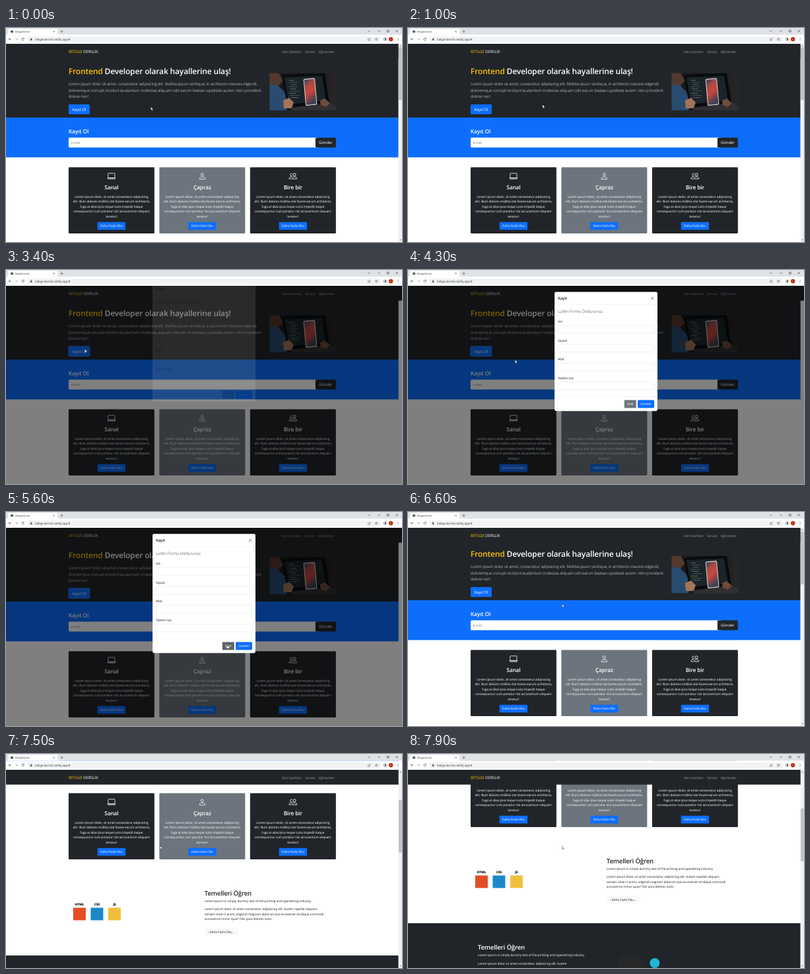
An HTML page for the animation above (8 s loop, 600x325 px).

```html
<!DOCTYPE html>
<html lang="tr">
<head>
<meta charset="utf-8">
<title>BitilgeDerslik</title>
<style>
html, body { margin: 0; width: 100%; height: 100%; overflow: hidden; background: #fff; }
svg { display: block; width: 600px; height: 325px; }
text {
  font-family: "Open Sans", "Noto Sans", sans-serif;
  letter-spacing: -.017em;
  text-rendering: geometricPrecision;
  white-space: pre;
}
</style>
</head>
<body>
<svg id="stage" viewBox="0 0 600 325" xmlns="http://www.w3.org/2000/svg"></svg>
<script>
const DARK = '#212529', BLUE = '#0d6efd', GREY = '#6c757d', AMBER = '#ffc107', INK = '#46494d';
const LOOP = 8000, STEP = 100;

// ---------- drawing helpers ----------
const rect = (x, y, w, h, fill, r = 0, more = '') =>
  `<rect x="${x}" y="${y}" width="${w}" height="${h}" fill="${fill}" rx="${r}" ${more}/>`;
const text = (x, y, str, size = 5, fill = '#fff', weight = 400, anchor = 'start') =>
  `<text x="${x}" y="${y}" font-size="${(size * .96).toFixed(2)}" fill="${fill}" font-weight="${weight}" text-anchor="${anchor}">${str}</text>`;
const lines = (x, y, step, rows, ...style) =>
  rows.map((row, i) => text(x, y + i * step, row, ...style)).join('');
const line = (d, stroke, width = .4, fill = 'none') =>
  `<path d="${d}" stroke="${stroke}" stroke-width="${width}" fill="${fill}" stroke-linejoin="round"/>`;
const group = (id, body) => `<g id="${id}">${body}</g>`;
const dot = (x, y, r, fill) => `<circle cx="${x}" cy="${y}" r="${r}" fill="${fill}"/>`;
const poly = (points, fill) => `<polygon points="${points}" fill="${fill}"/>`;

// ---------- page ----------
function photo() {
  let code = '';
  for (let i = 0; i < 9; i++) {
    code += rect(429 + i % 3 * 1.5, 79 + i * 3.3, 7 + i * 5 % 9, .7, i % 2 ? '#4d6a68' : '#77807c');
  }
  return `<g clip-path="url(#photoBox)">
    ${rect(399.5, 68.5, 100.5, 56.5, 'url(#room)')}
    ${poly('399,68 413,68 420,80 411,90 399,86', '#53392d')}
    ${poly('399,86 411,86 422,97 428,112 425,126 399,126', '#294b70')}
    ${poly('418,72 483,68.5 490,113 427,120', '#080b0e')}
    ${poly('422,75 479,72.5 485,110 429,116', '#1b2429')}
    ${code}
    ${poly('420,110 429,106 436,113 433,122 421,122', '#a27458')}
    <g transform="rotate(-5 461 98)">
      ${rect(452.5, 76.5, 17.5, 41, '#d9d5d6', 2)}
      ${rect(453.5, 77.8, 15.5, 38.4, 'url(#screen)', 1.4)}
    </g>
    ${poly('432,121 492,114 500,118 500,126 432,126', '#302f31')}
    ${poly('476,110 483,107 491,114 485,120 477,117', '#6f4b3a')}
  </g>`;
}

const icons = [
  line('M2.5 2.5h11a1 1 0 0 1 1 1v8h-13v-8a1 1 0 0 1 1-1zM.5 11.5h15v.5a1.5 1.5 0 0 1-1.5 1.5H2A1.5 1.5 0 0 1 .5 12z', '#fff', 1),
  line('M10.5 5a2.5 2.5 0 1 1-5 0 2.5 2.5 0 0 1 5 0zM2.5 13.3c0-2.6 2.5-3.8 5.5-3.8s5.5 1.2 5.5 3.8q0 .7-.7.7H3.2q-.7 0-.7-.7z', '#fff', 1),
  line('M13.5 5a2.5 2.5 0 1 1-5 0 2.5 2.5 0 0 1 5 0zM6.5 12.8c0-2.2 1.7-3.6 4.5-3.6s4.5 1.400 4.500 3.600q0 .6-.6.6H7.100q-.6 0-.6-.6zM6.800 7A2.400 2.400 0 1 1 6.800 3.600M5 13.400H1.100q-.6 0-.6-.6C.5 10.600 2.200 9.200 5.800 9.200', '#fff', 1.1)
];

const cardText = [
  'Lorem ipsum dolor, sit amet consectetur adipisicing',
  'elit. Illum dolores mollitia iste facere earum architecto,',
  'fuga at alias ipsa neque iusto impedit itaque',
  'consequuntur cum pariatur nisi accusantium aliquam',
  'tenetur!'
];

function card(i, title) {
  const x = 95 + i * 137.5, mid = x + 65;
  return rect(x, 211.5, 130, 100.5, i === 1 ? GREY : DARK, 1.25) +
    `<g transform="translate(${mid - 6.25} 218.7) scale(.78)">${icons[i]}</g>` +
    text(mid, 245.4, title, 8.75, '#fff', 600, 'middle') +
    lines(mid, 257.8, 7.5, cardText, 5, '#fff', 400, 'middle') +
    rect(mid - 21.2, 294.7, 42.4, 11.9, BLUE, 1.2) +
    text(mid, 302.3, 'Daha Fazla Oku', 5, '#fff', 400, 'middle');
}

const badge = (x, label, fill) =>
  text(x + 9.5, 382.4, label, 5, '#111', 800, 'middle') + rect(x, 385.5, 19, 19, fill);

const intro = 'Lorem Ipsum is simply dummy text of the printing and typesetting industry.';

const page =
  rect(0, 24, 594.85, 112.5, DARK) +
  `<text x="95" y="70.2" font-size="12" font-weight="600" fill="#fff" style="letter-spacing:-.013em"><tspan fill="${AMBER}">Frontend</tspan> Developer olarak hayallerine ulaş!</text>` +
  lines(95, 87.4, 9.375, [
    'Lorem ipsum dolor sit amet, consectetur adipisicing elit. Mollitia ipsum similique, in architecto maiores eligendi,',
    'doloremque corrupti incidunt laudantium molestias aliquam odit earum beatae cupiditate autem. Vero provident',
    'dolore non!'
  ], 6.25, '#fff', 300) +
  rect(95, 116, 32, 15, BLUE, 1.5, 'id="join"') +
  text(111, 125.8, 'Kayıt Ol', 6.25, '#fff', 400, 'middle') +
  photo() +
  rect(0, 136, 594.85, 60.5, BLUE) +
  text(95, 159.7, 'Kayıt Ol', 8.75, '#fff', 600) +
  rect(95, 166.5, 380, 15, '#fff', 1.5) +
  text(99, 175.7, 'e mail', 5, GREY) +
  rect(469, 166.5, 31, 15, DARK, 1.5) +
  text(484.5, 176.3, 'Gönder', 6.25, '#fff', 400, 'middle') +
  ['Sanal', 'Çapraz', 'Bire bir'].map((title, i) => card(i, title)).join('') +
  badge(102, 'HTML', '#e44d26') + badge(128.5, 'CSS', '#1c88c7') + badge(155, 'JS', '#f0bf3c') +
  text(301, 366.6, 'Temelleri Öğren', 10, DARK, 600) +
  text(301, 376.8, intro, 5, DARK) +
  lines(301, 389.3, 7.5, [
    'Lorem ipsum dolor sit amet consectetur adipisicing elit. Autem repellat aliquam',
    'veniam vitae in animi, eligendi magnam dolorum quo ex eveniet similique commodi',
    'accusamus minus quas? Nisi quia dolores iusto.'
  ], 5, DARK) +
  rect(301, 416, 51, 12, '#f8f9fa', 1.2) +
  text(306, 423.8, '› Daha Fazla Oku...', 5, DARK) +
  rect(0, 458, 594.85, 160, DARK) +
  text(106, 498.1, 'Temelleri Öğren', 10, '#fff', 600) +
  text(106, 508.3, intro, 5, '#fff') +
  text(106, 520.8, 'Lorem ipsum dolor sit amet consectetur adipisicing elit. Autem', 5, '#fff') +
  dot(338, 524, 20, '#272829') + dot(374, 518.5, 7.5, '#1fb5d6');

const nav =
  rect(0, 23, 600, 23.5, DARK) +
  `<text x="95" y="38" font-size="6" fill="#fff"><tspan fill="${AMBER}">BİTİLGE</tspan> DERSLİK</text>` +
  [[418, 'Ders İçerikleri'], [453, 'Sorular'], [474, 'Eğitmenler']]
    .map(([x, label]) => text(x, 37.7, label, 5, '#9b9d9f')).join('');

const scrollbar =
  rect(594.7, 24, 5.3, 301, '#f1f1f1') +
  poly('596.2,27.8 598.6,27.8 597.4,26.3', '#505050') +
  poly('596.2,321.3 598.6,321.3 597.4,322.8', '#505050') +
  rect(595, 29.3, 4.7, 80, '#c1c1c1', 0, 'id="thumb"');

// ---------- modal ----------
const field = (i, label) =>
  text(227, 79.8 + i * 28.7, label, 5, DARK) +
  rect(226.9, 84.2 + i * 28.7, 146, 11.7, '#fff', 1.2, 'stroke="#ced4da" stroke-width=".35"');

const modal =
  rect(222, 33.2, 156, 181, '#fff', 2.4, 'stroke="#000" stroke-opacity=".2" stroke-width=".3"') +
  text(227, 45.2, 'Kayit', 6.25, DARK, 600) +
  line('M368 40.7l4.5 4.5m0-4.5l-4.5 4.5', '#555', .7) +
  line('M222 52.5h156M222 192.3h156', '#dee2e6', .35) +
  text(227, 65.2, 'Lütfen Formu Doldurunuz.', 6.25, DARK, 300) +
  ['Ad:', 'Soyad:', 'Mail:', 'Telefon No:'].map((label, i) => field(i, label)).join('') +
  rect(327.8, 197.4, 18, 12, GREY, 1.2, 'id="cancel"') +
  text(336.8, 205.2, 'İptal', 5, '#fff', 400, 'middle') +
  rect(348, 197.4, 25, 12, BLUE, 1.2) +
  text(360.5, 205.2, 'Gonder', 5, '#fff', 400, 'middle');

// ---------- browser frame ----------
const browser =
  rect(0, 0, 600, 10.3, '#dee1e6') +
  '<path d="M1 10.3q2 0 2-2v-5q0-2 2-2h71.5q2 0 2 2v5q0 2 2 2z" fill="#fff"/>' +
  rect(0, 10.3, 600, 13.7, '#fff') +
  dot(9, 5.5, 2.1, '#45494d') + line('M7.5 5l1.2.8.9-.9M8.5 7l1-.7', '#fff', .4) +
  text(14, 7, 'BitilgeDerslik', 3.9, '#3c4043') +
  line('M71.3 4.2l2.4 2.4m0-2.4l-2.4 2.4M84.5 3.3v4m-2-2h4', INK, .6) +
  line('M548 3.8l1.7 1.7 1.7-1.7M563.5 4.7h3.2M577.5 3.3h2.7V6h-2.7zM590.7 3.2l3 3m0-3l-3 3', '#222', .55) +
  line('M8 17H4.300m1.700-1.700L4.300 17 6 18.700', INK, .7) +
  line('M14.3 17H18m-1.7-1.7L18 17l-1.7 1.7', '#a4a7aa', .7) +
  line('M33.3 15.9a1.8 1.8 0 1 0 .2 1.8M33.7 14.8v1.5h-1.5', INK, .65).replace('<path', '<path transform="translate(-6.3 0)"') +
  rect(32, 12.7, 537, 8.8, '#f1f3f4', 4.4) +
  rect(36.8, 16.6, 2.6, 2.1, INK, .3) + line('M37.3 16.6v-.7a.8.8 0 0 1 1.6 0v.7', INK, .45) +
  text(44, 18.6, 'bitilge-derslik.netlify.app/#', 4.7, '#3c4043') +
  line('M549.5 16.2h-1v2.6h3.4v-1M550 17.5q.2-1.7 2-1.7m-.8-.9l.9.9-.9.9', INK, .5) +
  line('M561.2 15l.6 1.3 1.4.1-1.1 1 .4 1.4-1.3-.8-1.3.8.4-1.4-1.1-1 1.4-.1z', INK, .5) +
  rect(572.3, 15.3, 3.6, 3.4, 'none', .4, `stroke="${INK}" stroke-width=".55"`) + rect(574.3, 15.3, 1.6, 3.4, INK) +
  dot(583.2, 17, 3.2, '#c8300f') + text(583.2, 18.1, 'c', 3.2, '#fff', 400, 'middle') +
  [15.4, 17, 18.6].map(y => dot(594, y, .5, INK)).join('');

const arrow = line('M0 0v4.9l1.15-1.05.8 1.85.85-.35-.8-1.8h1.55z', '#000', .3, '#fff');
const hand = line('M-.6.4q.6-.8 1.2 0v2l2.1.5q.8.3.7 1.2L3 6H-.1l-1.800-2.300q0-.8.8-.5l.5.4z', '#000', .3, '#fff');

const $ = id => document.getElementById(id);
$('stage').innerHTML = `
  <defs>
    <clipPath id="photoBox"><rect x="399.5" y="68.5" width="100.5" height="56.5"/></clipPath>
    <linearGradient id="room"><stop stop-color="#1f1d1f"/><stop offset=".5" stop-color="#0d1013"/><stop offset="1" stop-color="#292628"/></linearGradient>
    <linearGradient id="screen" x2=".3" y2="1"><stop stop-color="#2c4258"/><stop offset=".3" stop-color="#a84a48"/><stop offset=".6" stop-color="#c9453d"/><stop offset="1" stop-color="#3c4356"/></linearGradient>
  </defs>
  ${rect(0, 0, 600, 325, '#fff')}
  ${group('page', page)}${nav}${group('bar', scrollbar)}
  ${rect(0, 24, 600, 301, '#000', 0, 'id="shade"')}
  ${group('modal', modal)}${browser}
  ${group('cursor', group('arrow', arrow) + group('hand', hand))}`;

// ---------- motion ----------
const pointer = [
  [0, 219.5, 120], [500, 219.5, 120], [2100, 152.2, 105.2], [2900, 119.5, 120.5], [3900, 119.5, 120.5],
  [5300, 335, 201.3], [5800, 335, 201.3], [6300, 249, 143.5], [6400, 233.5, 139.7]
];
const scrolling = [
  [6500, 0], [6600, 2], [6700, 22], [6800, 49], [6900, 76], [7000, 93.4],
  [7200, 112], [7500, 152], [7900, 201]
];
const OPEN = 3230, CLOSE = 5750;

const clamp = v => Math.min(1, Math.max(0, v));
const ramp = (t, start, length) => clamp((t - start) / length);
const easeOut = p => 1 - (1 - p) ** 1.75;
const smooth = p => p * p * (3 - 2 * p);

function track(keys, t, ease = p => p) {
  let i = 0;
  while (i < keys.length - 2 && t >= keys[i + 1][0]) i++;
  const [a, b] = [keys[i], keys[i + 1]];
  const p = ease(ramp(t, a[0], b[0] - a[0]));
  return a.slice(1).map((v, k) => v + (b[k + 1] - v) * p);
}

function set(id, values) {
  for (const key in values) $(id).setAttribute(key, values[key]);
}

function draw(t) {
  const [x, y] = track(pointer, t, smooth);
  const [scroll] = track(scrolling, t);
  const shade = ramp(t, OPEN, 150) - ramp(t, CLOSE + 300, 150);
  const fade = ramp(t, OPEN + 155, 150) - ramp(t, CLOSE, 150);
  const drop = easeOut(ramp(t, OPEN + 155, 300)) - easeOut(ramp(t, CLOSE, 300));
  const open = t >= OPEN && t < CLOSE + 450;
  const onJoin = !open && x > 95 && x < 127 && y > 116 && y < 131;
  const onCancel = t > OPEN + 455 && t < CLOSE + 150 && x > 327.8 && x < 345.8 && y > 197.4 && y < 209.4;

  set('page', { transform: `translate(-.15 ${-scroll})` });
  set('thumb', { y: 29.3 + scroll * .266 });
  set('bar', { visibility: open ? 'hidden' : 'visible' });
  set('shade', { opacity: shade * .5 });
  set('modal', { opacity: fade, transform: `translate(0 ${(drop - 1) * 15.6})` });
  set('join', {
    fill: onJoin ? '#0b5ed7' : BLUE,
    stroke: open ? '#3184fd' : 'none', 'stroke-width': 1.3, 'stroke-opacity': .7
  });
  set('cancel', { fill: onCancel ? '#5c636a' : GREY });
  set('cursor', { transform: `translate(${x} ${y})` });
  set('arrow', { visibility: onJoin || onCancel ? 'hidden' : 'visible' });
  set('hand', { visibility: onJoin || onCancel ? 'visible' : 'hidden' });
}

const start = performance.now();
function tick() {
  const t = (performance.now() - start) % LOOP;
  draw(Math.floor(t / STEP) * STEP);
  requestAnimationFrame(tick);
}
tick();
</script>
</body>
</html>
```
